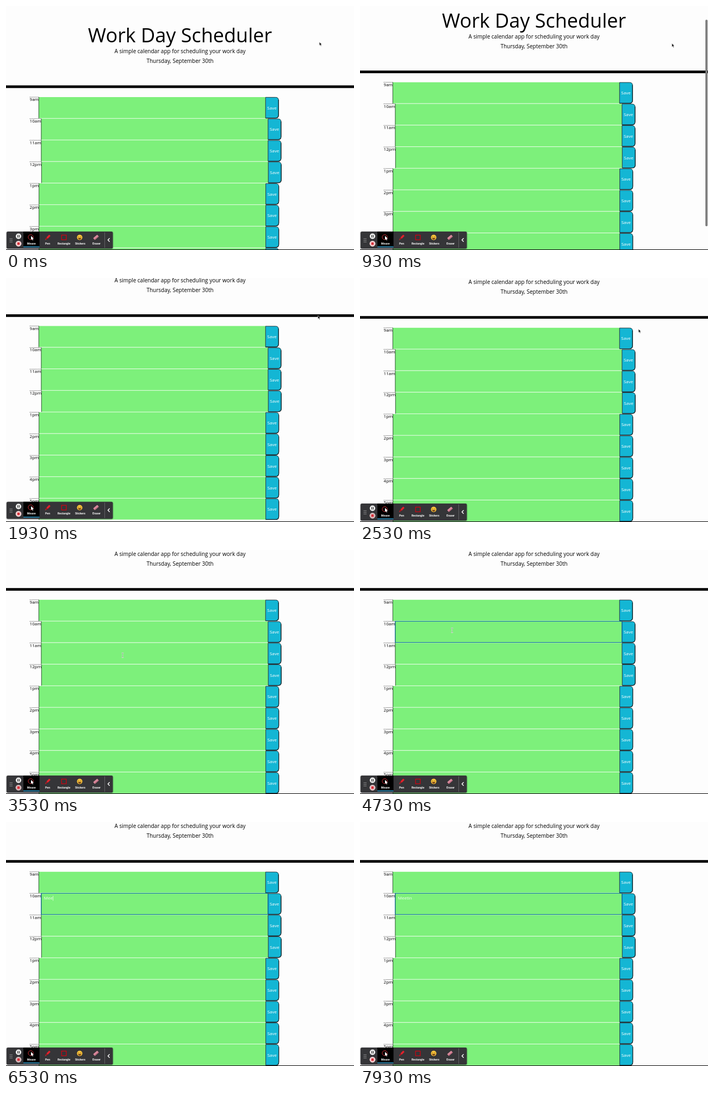
Write an HTML page that moves like this. It is 640 px wide and 450 px high and loops after 8 s.

```html
<!DOCTYPE html>
<html lang="en">
<head>
<meta charset="utf-8">
<title>Work Day Scheduler</title>
<style>
  html, body { margin: 0; width: 100%; height: 100%; overflow: hidden; background: #fdfdfd; }
  svg { display: block; width: 100vw; height: 100vh; }
  text { font-family: "Open Sans", sans-serif; white-space: pre; }
  .mid { text-anchor: middle; }
  .tool { font: 700 5.2px Roboto, sans-serif; fill: #f4f4f4; text-anchor: middle; }
</style>
</head>
<body>
<svg viewBox="0 0 640 450">
  <defs>
    <filter id="shade" x="-5%" y="-20%" width="110%" height="150%">
      <feDropShadow dx="0" dy="0.6" stdDeviation="1" flood-opacity="0.45"/>
    </filter>
  </defs>
  <rect width="640" height="450" fill="#fdfdfd"/>

  <g id="page">
    <text class="mid" x="320" y="67" font-size="36">Work Day Scheduler</text>
    <text class="mid" x="320" y="87" font-size="10">A simple calendar app for scheduling your work day</text>
    <text class="mid" x="320" y="105" font-size="10">Thursday, September 30th</text>
    <rect y="146.4" width="640" height="4.9"/>
    <g id="rows"></g>
    <rect id="focus" x="64.7" y="207.7" width="417" height="39" fill="none" stroke="#1673a8" stroke-width="1.1"/>
    <text id="entry" x="69.8" y="219.7" font-size="8" fill="#f2fff0"></text>
    <rect id="caret" y="212.4" width="0.7" height="9" fill="#f2fff0"/>
  </g>

  <rect id="thumb" x="635.2" width="4" height="381" rx="2" fill="#7d7d7d"/>
  <rect y="448.9" width="640" height="1.1" fill="#111"/>

  <g id="bar">
    <rect x="1" y="416" width="195.5" height="31.5" rx="2.5" fill="#343537" filter="url(#shade)"/>
    <g id="grip" fill="#c8c8c8"></g>
    <circle cx="23" cy="424.6" r="5.1" fill="#ededed"/>
    <path d="M21.6 422.3v4.6M24.4 422.3v4.6" stroke="#333" stroke-width="1.3"/>
    <circle id="pulse" cx="23" cy="438.3" r="5.4" fill="#f3cfd1"/>
    <rect x="20.8" y="436.1" width="4.4" height="4.4" rx="0.6" fill="#d9303a"/>

    <rect x="32" y="416" width="29.6" height="29" fill="#000"/>
    <rect x="32" y="443.6" width="29.6" height="1.4" fill="#2fa8dc"/>
    <circle cx="45.5" cy="426.3" r="4.6" fill="none" stroke="#d8343c" stroke-width="1"/>
    <path d="M46 424v7.2l1.7-1.5 1.2 2.6 1.2-.6-1.2-2.4h2.3z" fill="#fff"/>

    <g transform="translate(76.5 427) rotate(45)">
      <rect x="-1.7" y="-6" width="3.4" height="7.4" rx="0.7" fill="#e3212b"/>
      <path d="M-1.7 2h3.4L.8 4.6h-1.6z" fill="#b5121c"/>
      <rect x="-0.6" y="4.6" width="1.2" height="1.4" fill="#e3212b"/>
    </g>
    <rect x="102.2" y="422.5" width="8.6" height="8.6" fill="none" stroke="#d6000f" stroke-width="1.2"/>

    <circle cx="135.5" cy="426.8" r="5" fill="#f8c33a"/>
    <path d="M132.4 426.2q1-1.5 2 0M136.5 426.2q1-1.5 2 0" fill="none" stroke="#5b3a12" stroke-width=".8"/>
    <path d="M132.4 427.8h6.2q-.6 3-3.1 3t-3.1-3z" fill="#74401a"/>

    <g transform="translate(165.5 426.6) rotate(-40)">
      <rect x="-5" y="-2.3" width="10" height="4.6" rx="1" fill="#d98a9c"/>
      <rect x="-5" y="0.8" width="10" height="1.5" rx="0.7" fill="#b8677c"/>
    </g>
    <g id="tools"></g>
    <path d="M181.5 417.5v28.5" stroke="#77787a" stroke-width="0.7"/>
    <path d="M190.6 428.3l-3.1 3.2 3.1 3.2" fill="none" stroke="#fff" stroke-width="1.4"/>
  </g>

  <path id="arrow" d="M0 0v6.4l1.5-1.3 1.1 2.4 1.2-.5-1.1-2.4h2z" fill="#111" stroke="#fff" stroke-width="0.5"/>
  <g id="beam" fill="none">
    <path d="M-2-4.2Q0-4.2 0-3Q0-4.2 2-4.2M0-3v6M-2 4.2Q0 4.2 0 3Q0 4.2 2 4.2" stroke="#fff" stroke-opacity=".8" stroke-width="1.6"/>
    <path d="M-2-4.2Q0-4.2 0-3Q0-4.2 2-4.2M0-3v6M-2 4.2Q0 4.2 0 3Q0 4.2 2 4.2" stroke="#5f8f5e" stroke-width="0.6"/>
  </g>
</svg>
<script>
const LOOP = 8000, BOTTOM = 76.2, PITCH = 39.77, FOCUS_AT = 4100;
const $ = id => document.getElementById(id);
const el = Object.fromEntries([...document.querySelectorAll('[id]')].map(n => [n.id, n]));

// Each row starts where its label ends.
const hours = ['9am', '10am', '11am', '12pm', '1pm', '2pm', '3pm', '4pm', '5pm'];
const left = h => h.length === 3 ? (h === '9am' ? 60.1 : 60.5) : (h === '12pm' ? 65.1 : 64.7);

function row(hour, i) {
  const x = left(hour), b = x + 416.9;
  return `<g transform="translate(0 ${168 + i * PITCH})">
    <path d="M43.6 .1H${x}" stroke="#222" stroke-width=".7" stroke-dasharray="1.4 .8"/>
    <text x="43.6" y="7.2" font-size="8">${hour}</text>
    <rect x="${x}" width="417" height="39.2" fill="#7df07b"/>
    <path d="M${x} 39.3H${b}" stroke="#f4fff3" stroke-width=".9"/>
    <path d="M${x + .2} 0V39.2" stroke="#15301a" stroke-width=".8"/>
    <path d="M${b + .3} .4h18.4q5.6 0 5.6 5.6v27.2q0 5.6-5.6 5.6h-18.4z" fill="#14b6d4" stroke="#17262b" stroke-width=".9"/>
    <path d="M${b + 24.2} 5v28q0 5.7-5.7 5.7h-18" fill="none" stroke="#17262b" stroke-width="1.2"/>
    <text class="mid" x="${b + 12}" y="22.6" font-size="8" fill="#fff">Save</text>
  </g>`;
}

el.rows.innerHTML = hours.map(row).join('');
el.tools.innerHTML = ['Mouse', 'Pen', 'Rectangle', 'Stickers', 'Eraser']
  .map((s, i) => `<text class="tool" x="${46.6 + i * 29.95}" y="439.6">${s}</text>`).join('');
el.grip.innerHTML = [0, 1, 2, 3, 4, 5]
  .map(i => `<circle cx="${7.8 + i % 2 * 2.9}" cy="${429.3 + (i >> 1) * 3}" r=".75"/>`).join('');

const scrollKeys = [[60, 0], [930, 27.3], [1700, BOTTOM], [1860, 79.8], [1930, 79.5], [2130, BOTTOM]];
const pointerKeys = [
  [0, 576.3, 66.5], [700, 573.6, 69], [2330, 573.6, 69], [2800, 430, 128],
  [3250, 214.5, 194], [3580, 214.5, 194], [4000, 169.3, 148]
];
const typing = [[6100, 'M'], [6260, 'e'], [6420, 'e'], [6900, 't'], [7150, 'i'], [7400, 'n']];

function track(keys, t, col = 1) {
  const i = keys.findIndex(k => k[0] > t);
  if (i < 0) return keys[keys.length - 1][col];
  if (i === 0) return keys[0][col];
  const a = keys[i - 1], b = keys[i];
  return a[col] + (b[col] - a[col]) * (t - a[0]) / (b[0] - a[0]);
}

const show = (node, on) => node.setAttribute('visibility', on ? 'visible' : 'hidden');
const move = (node, x, y) => node.setAttribute('transform', `translate(${x} ${y})`);

function draw(t) {
  const scroll = track(scrollKeys, t);
  move(el.page, 0, -scroll);
  // The fixed toolbar follows the page while it bounces past its end.
  move(el.bar, 0, Math.min(0, BOTTOM - scroll));

  el.thumb.setAttribute('y', 2 + Math.min(scroll, BOTTOM) * 0.85);
  el.thumb.setAttribute('opacity', track([[60, 0], [200, 1], [1730, 1], [1900, 0]], t));

  const typed = typing.filter(k => k[0] <= t);
  const focused = t >= FOCUS_AT;
  const last = typed.length ? typed[typed.length - 1][0] : FOCUS_AT;
  el.entry.textContent = typed.map(k => k[1]).join('');
  el.caret.setAttribute('x', 70 + (typed.length ? el.entry.getComputedTextLength() : 0));
  show(el.focus, focused);
  show(el.caret, focused && (t - last) % 1000 < 500);

  const x = track(pointerKeys, t), y = track(pointerKeys, t, 2);
  const overField = x < 481;
  move(el.arrow, x, y);
  move(el.beam, x, y);
  show(el.arrow, !overField);
  show(el.beam, overField && !typed.length);

  el.pulse.setAttribute('fill-opacity', 0.92 + 0.08 * Math.cos(t * Math.PI / 500));
}

const start = performance.now();
function tick() {
  draw((performance.now() - start) % LOOP);
  requestAnimationFrame(tick);
}
tick();
</script>
</body>
</html>
```
